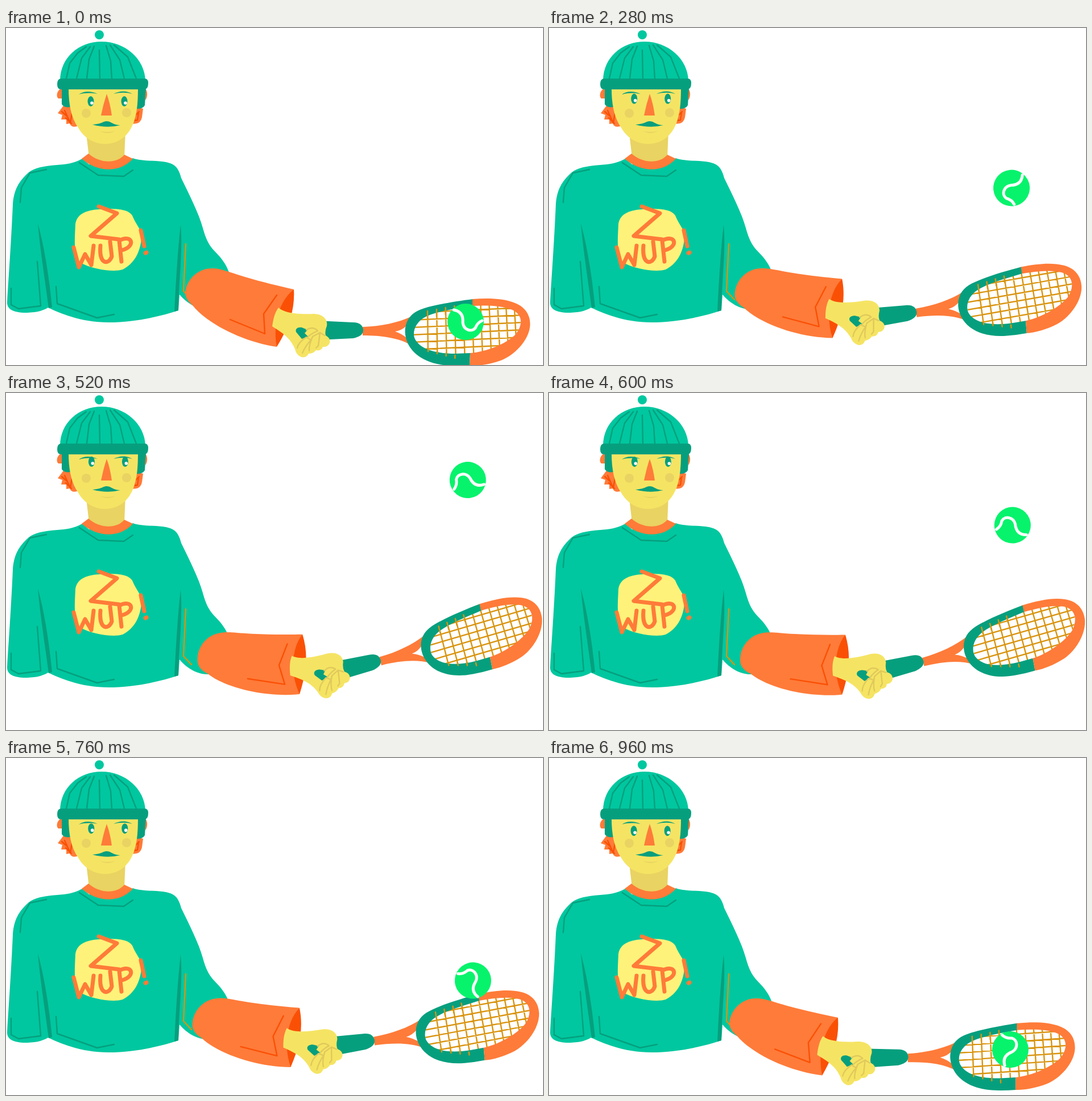
Animation of 944x593 px, one loop 1000 ms. Source, as an HTML page:

```html
<!DOCTYPE html>
<html lang="en">
<head>
<meta charset="utf-8">
<title>Racket bounce</title>
<style>
  html, body { margin: 0; width: 100%; height: 100%; overflow: hidden; background: #fff; }
  svg { display: block; width: 100%; height: 100%; }
  .teal { fill: #00c79f; }
  .dark { fill: #069f7e; }
  .skin { fill: #f5e463; }
  .shade { fill: #e9d362; }
  .orange { fill: #ff7b39; }
  .rust { fill: #fa5005; }
  .line { fill: none; stroke-width: 2.4; stroke-linecap: round; stroke-linejoin: round; }
  .line.dk { stroke: #069f7e; }
  .line.ru { stroke: #fa5005; }
  .line.oc { stroke: #d9940f; }
  .line.sh { stroke: #e0c95c; }
</style>
</head>
<body>
<svg viewBox="0 0 944 593">
  <defs>
    <clipPath id="bed">
      <path transform="translate(0 -42.5) scale(1 1.08)" d="M820 489C790 494 760 498 740 507C722 515 714 532 718 545C726 565 755 573 790 573L815 572C845 570 880 555 895 540C908 525 910 505 890 496C870 488 845 488 820 489Z"/>
    </clipPath>
  </defs>

  <!-- head -->
  <circle class="teal" cx="164" cy="12" r="8"/>
  <path class="shade" d="M141 185L146 228C165 240 195 240 208 228L210 180Z"/>
  <g class="orange">
    <path d="M99 106C90 108 87 120 92 124H101Z"/>
    <path d="M243 106C250 109 249 122 245 127Z"/>
    <path d="M103 134L91 150L99 153L97 161L106 161L106 169L112 168Q115 176 125 173L120 138Z"/>
    <path d="M227 138L241 142L239 157Q236 171 220 168Z"/>
  </g>
  <path class="line ru" d="M98 147L108 156L103 145L113 167L116 150M105 158L115 168M234 147L226 155V163L231 162L233 148"/>
  <path class="dark" d="M98 106V134Q102 141 113 139V106ZM229 106V142Q240 143 244 136L246 106Z"/>
  <path class="skin" d="M110 106C110 135 115 158 126 174C136 192 153 204 174 204C196 204 212 192 221 174C230 157 232 133 232 106Z"/>
  <path class="teal" d="M95 93C95 52 128 24 168 24C209 24 244 54 245 93Z"/>
  <path class="line dk" d="M141 33L126 44L112 62L106 89M148 33L133 53L124 89M155 32L146 55L142 89M164 39L165 89M176 31L184 58L186 89M183 30L200 56L208 89M190 30L214 51L229 89"/>
  <path class="dark" d="M96 89H244Q250 89 250 97Q250 108 243 108H97Q90 108 90 99Q90 90 96 89Z"/>
  <path class="dark" d="M128 117C137 110 150 111 161 116C150 114 137 114 128 117ZM189 116C200 110 213 110 222 116C213 113 200 113 189 116Z"/>
  <g id="eyes">
    <ellipse class="dark" cx="149" cy="129" rx="5.5" ry="9"/>
    <ellipse class="dark" cx="208" cy="129" rx="5.5" ry="9"/>
    <circle fill="#fff" cx="151" cy="132" r="2.8"/>
    <circle fill="#fff" cx="210" cy="132" r="2.8"/>
  </g>
  <circle class="shade" cx="141" cy="150" r="8"/>
  <circle class="shade" cx="212" cy="149" r="8"/>
  <path class="orange" d="M177 116Q171 134 167 154H186Q183 132 177 116Z"/>
  <path class="dark" d="M152 170Q165 169 172 165Q179 162 186 167Q193 171 201 171Q178 177 152 170Z"/>
  <path class="shade" d="M165 181Q178 185 192 181Q178 189 165 181Z"/>

  <!-- jumper -->
  <path class="teal" d="M134 230C120 238 105 240 90 241C65 243 50 246 40 254C22 270 14 285 12 310C9 380 5 430 2 483C2 496 15 500 30 501C50 501 62 499 74 492C105 507 140 518 180 518C225 518 270 508 303 497L305 469C318 484 335 495 355 495L380 490L400 450L392 430C387 416 379 405 368 394C356 382 351 370 346 352C339 326 322 293 308 264C303 245 297 238 275 235C255 233 235 234 223 229L208 240H146Z"/>
  <path class="orange" d="M133 230L145 221C165 239 195 239 208 223L223 230C200 256 160 254 133 230Z"/>
  <path class="dark" d="M56 344C66 380 75 430 81 491L75 493C68 440 60 390 56 344ZM307 346C311 390 304 440 303 497L296 499C299 440 302 390 307 346Z"/>
  <path class="line dk" d="M25 307L27 281L42 255L71 249M9 458V487L22 494L61 489L55 411M88 455L90 485L146 505L160 510L190 504M129 237L162 259L207 261L223 250"/>
  <path class="line oc" d="M316 380L312 463L326 478"/>
  <path fill="#fff27a" d="M122 345C125 325 145 320 165 319C190 317 215 318 222 330C230 350 240 355 238 370C236 395 225 415 205 425C190 430 150 425 130 412C118 400 121 370 122 345Z"/>
  <!-- hand-painted "Z WUP!" -->
  <path fill="none" stroke="#ff7b39" stroke-width="7" stroke-linecap="round" stroke-linejoin="round" d="M163 314L195 326L149 366L199 372M119 386L128 421L139 398L150 417L154 383M166 383C163 416 180 418 186 402L183 376M203 411L199 374C222 362 229 384 204 391M237 356L243 384M245 396L247 395"/>

  <g id="racket">
    <path class="orange" d="M627 526C660 525 690 518 712 508V558C690 545 660 541 627 541Z"/>
    <path fill="#fff" d="M684 534Q696 532 704 524Q701 535 705 546Q696 538 684 534Z"/>
    <path id="strings" class="line oc" clip-path="url(#bed)"/>
    <path class="dark" d="M821 477C790 481 745 488 725 497C705 506 700 525 702 540C706 570 735 592 780 594Q798 595 815 594L816 572L790 573C755 573 726 565 718 545C714 532 722 515 740 507C760 498 790 494 820 489Z"/>
    <path class="orange" d="M820 477C850 475 875 476 895 484C915 492 923 508 921 526C918 550 895 575 870 585C850 592 830 595 815 594L816 572C845 570 880 555 895 540C908 525 910 505 890 496C870 488 845 488 820 489Z"/>
    <path class="line oc" id="pegs"/>
    <path class="dark" d="M546 515L610 518C622 518 628 524 628 532C628 540 620 544 610 546L550 549Z"/>
  </g>

  <g id="forearm">
    <path class="rust" d="M506 460C508 495 498 525 476 561L460 530L480 475Z"/>
    <path class="orange" d="M315 465C318 440 340 422 363 423C378 423 390 429 420 438C450 447 480 454 506 460C482 478 468 520 476 561C420 553 355 522 328 488C318 480 315 472 315 465Z"/>
    <path class="line ru" d="M476 470L453 503L455 538L394 513"/>
    <path class="skin" d="M479 492C488 501 510 504 540 503C556 503 566 512 564 524Q560 534 562 541Q571 546 569 554Q566 562 557 561Q554 569 545 567Q540 573 532 573Q528 581 519 579Q510 575 508 565C500 545 484 535 468 525C470 510 473 500 479 492Z"/>
    <path class="dark" d="M510 535C508 529 513 526 520 527L530 531L525 537L531 543L520 547Z"/>
    <path class="line sh" d="M528 531Q540 524 548 533Q538 537 531 543M512 563Q514 553 528 544L536 549Q526 560 521 572M536 549L539 543Q532 559 533 568M539 543L552 536L549 559L545 563M552 536L560 541"/>
  </g>

  <g id="ball">
    <circle r="32" fill="#07f36c"/>
    <path fill="none" stroke="#fff" stroke-width="5" stroke-linecap="round" d="M-21 -21C-9 -19 -4 -11 -5 1C-4 14 10 19 17 11C20 3 24 0 29 -2"/>
  </g>
</svg>
<script>
const $ = id => document.getElementById(id);

let cords = '', pegs = '';
for (let i = 0; i < 11; i++) {
  const x = 741 + i * 16 - i * i * 0.08, lean = 1 + i * 0.5;
  cords += `M${x} 480L${x + lean} 585`;
  if (i < 4) pegs += `M${x} ${498 - i * 3}v12M${x + 1} ${564 + i * 4}v5`;
}
for (let i = 0; i < 6; i++) {
  const y = 501 + i * 13;
  cords += `M712 ${y}L910 ${y - 9}`;
}
$('strings').setAttribute('d', cords);
$('pegs').setAttribute('d', pegs);

// straight moves between [time, value, ...] keys
function at(keys, t) {
  const i = Math.max(1, keys.findIndex(k => k[0] >= t));
  const a = keys[i - 1], b = keys[i], u = (t - a[0]) / (b[0] - a[0]);
  return a.slice(1).map((v, n) => v + (b[n + 1] - v) * u);
}

const LOOP = 1000, STEP = 40;
const swing = [[0, 0], [560, 14.75], [LOOP, 0]];
const flight = [[0, 808, 517], [103, 817.5, 497], [446, 809, 79.5], [860, 824.7, 491], [960, 811, 513], [LOOP, 808, 517]];
const spin = [[0, 0], [160, 50], [360, 108], [520, 150], [840, 228], [LOOP, 250]];

function draw(now) {
  const t = Math.floor((now % LOOP) / STEP) * STEP;
  const [angle] = at(swing, t), [x, y] = at(flight, t), [turn] = at(spin, t);
  $('forearm').setAttribute('transform', `rotate(${-angle} 367 379)`);
  $('racket').setAttribute('transform', `rotate(${-angle} 386 373)`);
  $('eyes').setAttribute('transform', `translate(${angle * 0.1} ${-angle * 0.6})`);
  $('ball').setAttribute('transform', `translate(${x} ${y}) rotate(${turn})`);
}

function tick() {
  draw(performance.now());
  requestAnimationFrame(tick);
}
tick();
</script>
</body>
</html>
```
